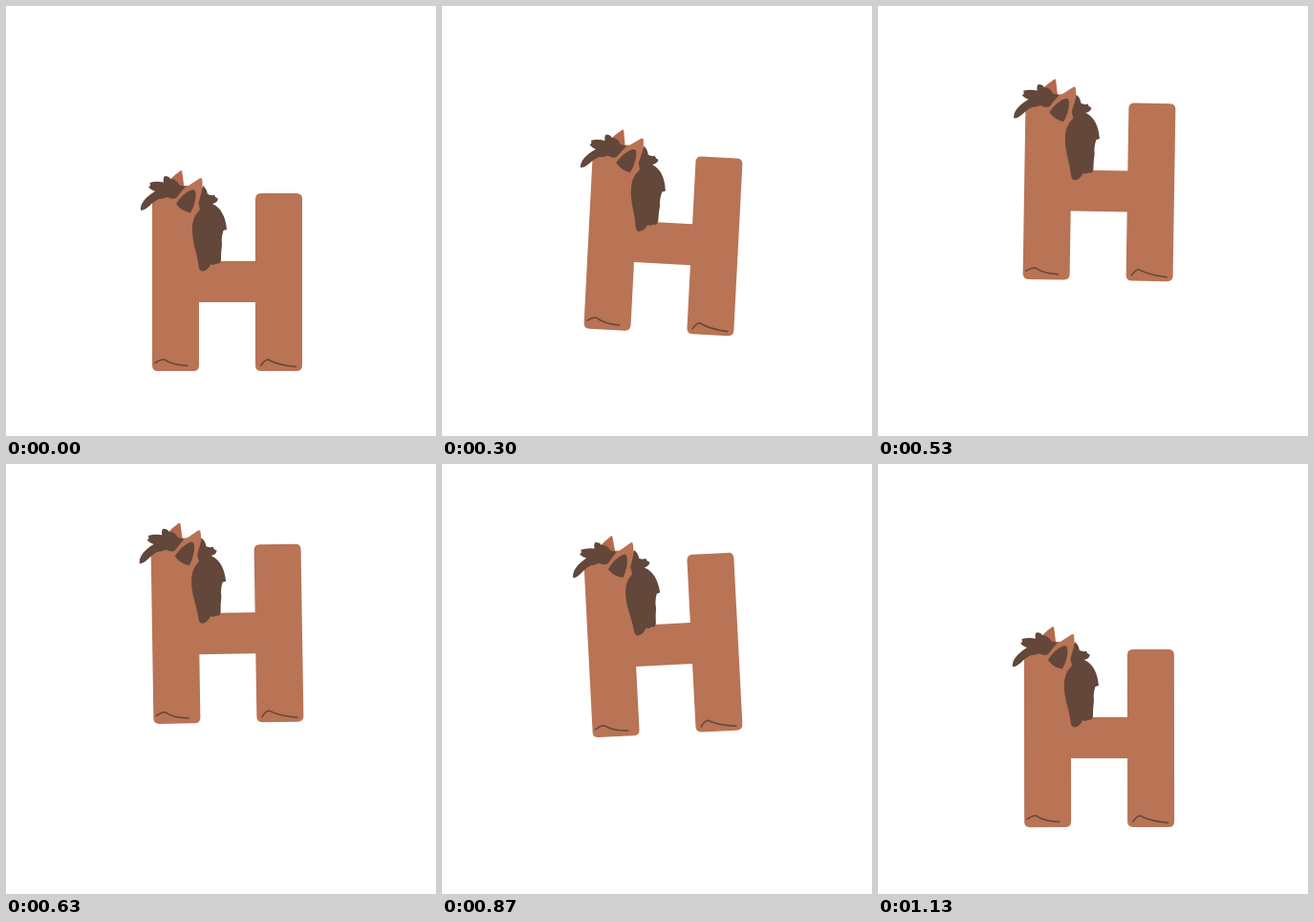
Recreate the animation shown at these times as an HTML page. Size 450 by 450 pixels, loop 1.16 s.

```html
<!DOCTYPE html>
<html lang="en">
<head>
<meta charset="utf-8">
<title>Jumping H</title>
<style>
  html, body { margin: 0; width: 100%; height: 100%; overflow: hidden; background: #fff; }
  svg { display: block; width: 100vw; height: 100vh; }
  .coat { fill: #b97355; }
  .hair { fill: #62473a; }
  .hoof { fill: none; stroke: #62473a; stroke-width: 1.5; stroke-linecap: round; stroke-linejoin: round; }
</style>
</head>
<body>
<svg viewBox="0 0 450 450">
  <g id="horse">
    <path fill="#b5694f" d="M170 183 Q176 177 182.500 172.500 Q184 171.500 184.300 173.500 L186.500 190 L176 194 Z"/>
    <path class="coat" d="M153 205 L166 196 L184 188 L203 188 L203 215 L215 267 H261 V202
      Q261 196 267 196 H304 Q310 196 310 202 V376 Q310 382 304 382 H267 Q261 382 261 376
      V310 H202 V376 Q202 382 196 382 H159 Q153 382 153 376 Z"/>
    <path class="hair" d="M141 214 C140 207 146 200 156 194 Q151 192 149 189.500 Q152 189 150.500 185
      Q157 183 165 184.500 Q164 180 166 178 Q171 178 172 181 C177 181 180 184 181.500 187.500
      L188 189 L178 201 Q174 203 169 200 Q164 202 160 202 C152 205 148 214 141 214 Z"/>
    <path class="hair" d="M206 188 Q210 191 211 197 Q216 199 218 197.500 Q219 201 222 201.500
      Q221 206 216 207 C225 211 230 221 231 234 L227.500 235 Q225 243 226 250
      Q225 257 225 266 Q224 271 220 269.500 Q217 272 214.500 270 Q211 277 206 277.500
      Q202 278 201.500 271 C200 258 195 248 195 235 Q194 222 203 213 L201 204 Z"/>
    <path class="coat" d="M176 207 Q180 197 188 190 L202.500 180.500 Q205 179 205.300 182
      Q206.500 190 203.500 199 Q201 210 193 219 Z"/>
    <path class="hair" d="M178 207 Q185 196 194 192.500 Q198 191 198.500 196 Q199 206 193 216.500 Q184 215 178 207 Z"/>
    <path class="hoof" d="M156 373.500 Q163 369 166 370.200 Q174 376 190 376.500"/>
    <path class="hoof" d="M266.500 376.500 Q271 370 274 370 Q285 376 303.500 377.500"/>
  </g>
</svg>
<script>
  const LOOP = 1160, FRAMES = 35;
  const horse = document.getElementById('horse');

  // [share of the loop, value], eased with a half cosine between steps
  const lift = [[0, 0], [0.65, -119], [1, 0]];
  const tilt = [[0, 0], [0.28, 3], [0.72, -3], [1, 0]];

  function sample(steps, p) {
    const i = steps.findIndex(s => s[0] > p);
    const [p0, v0] = steps[i - 1], [p1, v1] = steps[i];
    const u = (p - p0) / (p1 - p0);
    return v0 + (v1 - v0) * (1 - Math.cos(Math.PI * u)) / 2;
  }

  function draw(now) {
    // 30 pictures a second, on a 10 ms grid
    const tick = Math.floor((now % LOOP) / 10) * 10;
    const p = Math.floor((tick + 5) * 0.03) / FRAMES;
    horse.setAttribute('transform',
      `translate(0 ${sample(lift, p)}) rotate(${sample(tilt, p)} 231.5 289)`);
  }

  const start = performance.now();
  function loop() {
    draw(performance.now() - start);
    requestAnimationFrame(loop);
  }
  loop();
</script>
</body>
</html>
```
